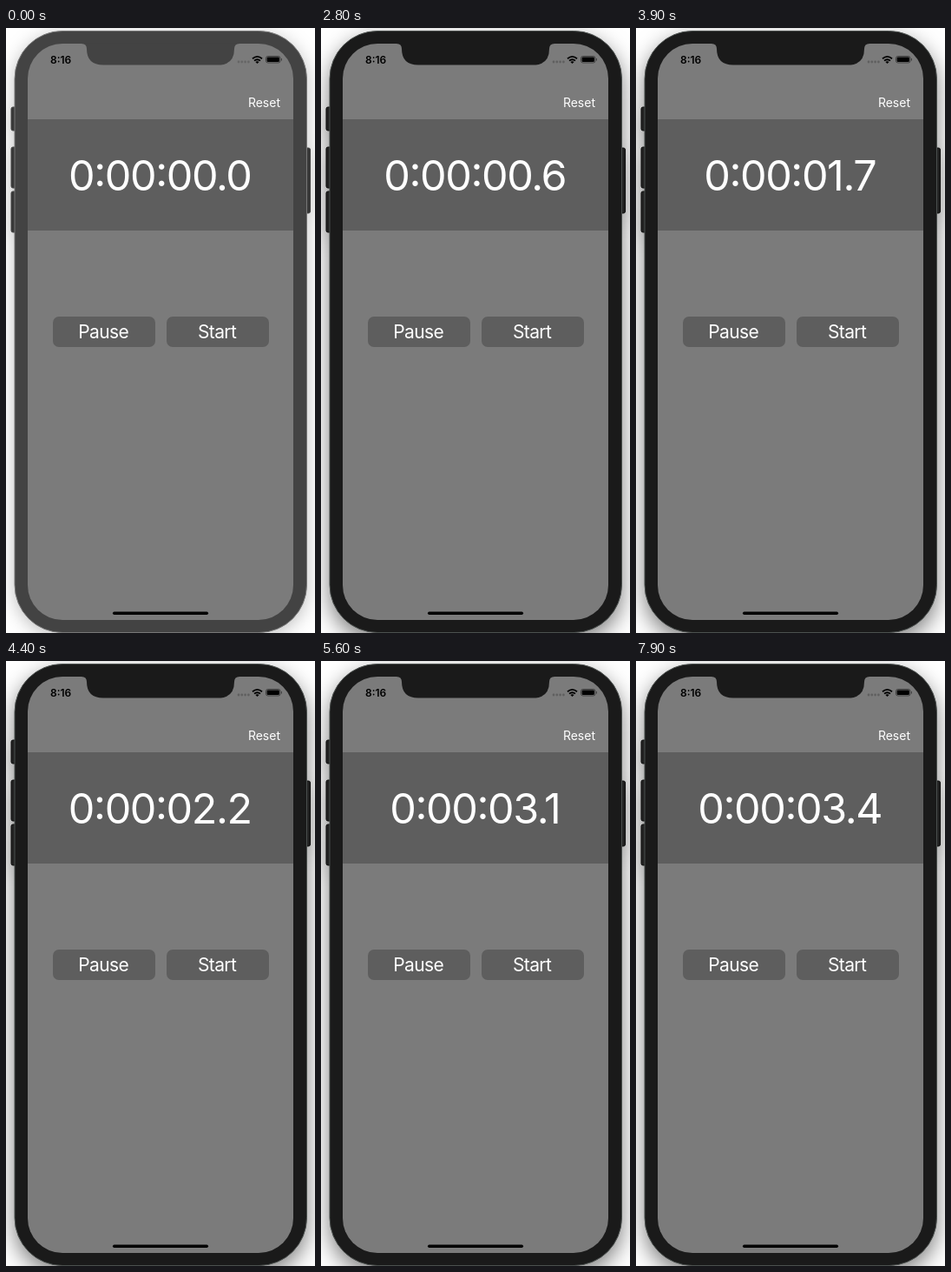
These frames come from a looping animation (356x696 px, 8 s). An HTML page:

```html
<!DOCTYPE html>
<html lang="en">
<head>
<meta charset="utf-8">
<title>Stopwatch</title>
<style>
html, body { margin: 0; width: 100%; height: 100%; overflow: hidden; background: #fff; }
svg { display: block; }
text { font-family: Inter, Roboto, sans-serif; fill: #fff; }
.phone { --body: #434343; --rim: #777; --key: #383838; --edge: #444; --dots: #666; }
.phone.active { --body: #1a1a1a; --rim: #4b504e; --key: #222; --edge: #0c0c0c; --dots: #606060; }
.case { filter: drop-shadow(0 4px 10px rgba(0,0,0,.25)); }
.active .case { filter: drop-shadow(0 9px 12px rgba(0,0,0,.5)); }
.body { fill: var(--body); stroke: var(--rim); }
.keys { fill: var(--key); stroke: var(--edge); }
.notch { fill: var(--body); }
.dots { fill: var(--dots); }
#time { font-size: 48.5px; letter-spacing: -1.4px; font-feature-settings: "calt" 1; }
.label { font-size: 21px; letter-spacing: -.6px; }
</style>
</head>
<body>
<svg id="phone" class="phone" width="356" height="696" viewBox="0 0 356 696">
  <g class="case">
    <g class="keys">
      <rect x="6" y="91" width="8" height="27" rx="2"/>
      <rect x="6" y="137" width="8" height="47" rx="2"/>
      <rect x="6" y="188" width="8" height="47" rx="2"/>
      <rect x="342" y="138" width="8.5" height="75" rx="2"/>
    </g>
    <rect class="body" x="10" y="3.5" width="336.5" height="692" rx="55"/>
  </g>
  <rect x="25" y="18" width="306" height="663" rx="40" fill="#7b7b7b"/>
  <rect x="25" y="105" width="306" height="128" fill="#5e5e5e"/>
  <path class="notch" d="M87 17.5H269V18Q263 18 263 24Q263 42.5 244 42.5H112Q93 42.5 93 24Q93 18 87 18Z"/>
  <g class="dots">
    <circle cx="268" cy="39" r="1.4"/><circle cx="271.8" cy="39" r="1.4"/>
    <circle cx="275.6" cy="39" r="1.4"/><circle cx="279.4" cy="39" r="1.4"/>
  </g>

  <text x="51" y="41" font-size="12" font-weight="600" style="fill:#000">8:16</text>
  <g fill="none" stroke="#000" stroke-width="1.8">
    <path d="M284 35.2Q289.5 30.6 295 35.2M286 37.6Q289.5 34.8 293 37.6"/>
    <path d="M287.4 38.9Q289.5 37.5 291.6 38.9L289.5 41Z" fill="#000" stroke="none"/>
    <rect x="299.5" y="32.5" width="16.5" height="7.5" rx="2.2" stroke="#333" stroke-width=".8"/>
    <rect x="300.6" y="33.6" width="14.3" height="5.3" rx="1.2" fill="#000" stroke="none"/>
    <path d="M317.4 35v2.6" stroke="#444" stroke-width="1"/>
  </g>

  <text x="316" y="91" font-size="14" text-anchor="end">Reset</text>
  <text id="time" x="177.3" y="187" text-anchor="middle">0:00:00.0</text>
  <g fill="#5e5e5e">
    <rect x="54" y="332" width="118" height="35" rx="7"/>
    <rect x="185" y="332" width="118" height="35" rx="7"/>
  </g>
  <g class="label" text-anchor="middle">
    <text id="pause" x="112.2" y="357">Pause</text>
    <text id="start" x="243.1" y="357">Start</text>
  </g>
  <rect x="123" y="671.5" width="110" height="3.5" rx="1.7"/>
</svg>
<script>
const LOOP = 8000, $ = id => document.getElementById(id);
const clamp = (v, lo, hi) => Math.min(hi, Math.max(lo, v));

// Elapsed tenths: one run, a pause, then a resumed run.
const tenths = step => clamp(step - 22, 0, 31) + Math.max(0, step - 76);

function clock(n) {
  const s = Math.floor(n / 10), pad = v => String(v).padStart(2, "0");
  return `${Math.floor(s / 3600)}:${pad(Math.floor(s / 60) % 60)}:${pad(s % 60)}.${n % 10}`;
}

// A pressed label dims, then fades back after release.
const press = (t, down, up) =>
  t < down ? 1 : t < up ? .25 : clamp(.25 + .75 * (t - up) / 250, 0, 1);

function draw(now) {
  const step = Math.floor(now % LOOP / 100), t = step * 100;
  $("phone").classList.toggle("active", t >= 2100);
  $("time").textContent = clock(tenths(step));
  $("pause").style.opacity = press(t, 5200, 5350);
  $("start").style.opacity = Math.min(press(t, 2100, 2200), press(t, 7400, 7600));
  requestAnimationFrame(draw);
}
draw(0);
</script>
</body>
</html>
```
